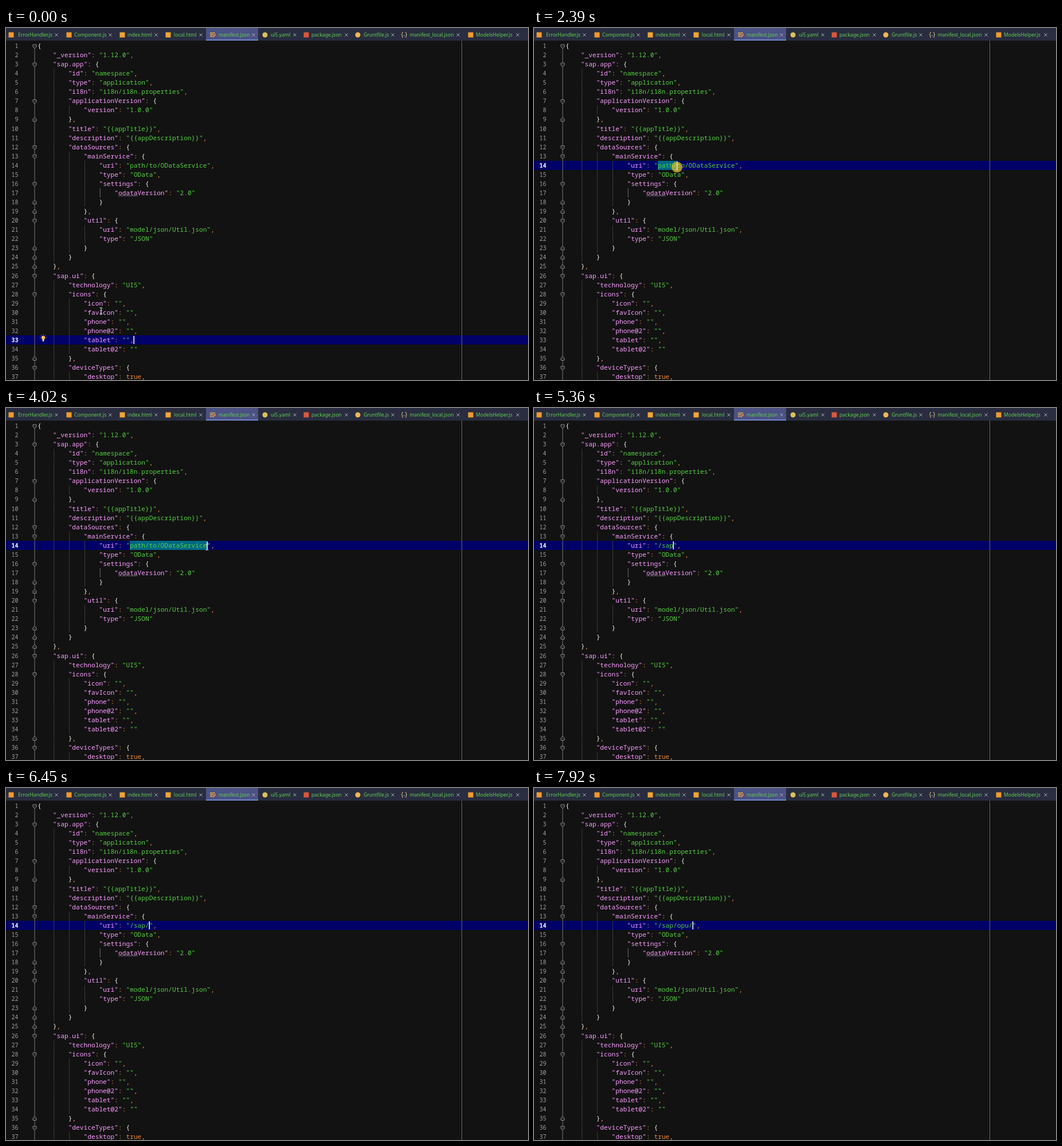
Recreate the animation shown at these times as an HTML page with a canvas. Size 911 by 615 pixels, loop 8 s.

```html
<!DOCTYPE html>
<html lang="en">
<head>
<meta charset="utf-8">
<title>Editor</title>
<style>
html, body { margin: 0; width: 100%; height: 100%; overflow: hidden; background: #121212; }
canvas { display: block; }
</style>
</head>
<body>
<canvas id="stage" width="911" height="615"></canvas>
<script>
const g = document.getElementById('stage').getContext('2d');
const LOOP = 8000, TICK = 1000 / 13;
const X0 = 54.9, CHAR = 6.72, ROW = 16.06;
const MONO = '"Noto Sans Mono", monospace', SANS = '"Noto Sans", sans-serif';
const BACK = '#121212', GREEN = '#54cf40', PINK = '#fb9cff', ORANGE = '#ee8a40', WHITE = '#f4f4f4';
const URI_ROW = 13, TABLET_ROW = 32, URI_COL = 24, TABLET_END = 25;

const source = `{
    "_version": "1.12.0",
    "sap.app": {
        "id": "namespace",
        "type": "application",
        "i18n": "i18n/i18n.properties",
        "applicationVersion": {
            "version": "1.0.0"
        },
        "title": "{{appTitle}}",
        "description": "{{appDescription}}",
        "dataSources": {
            "mainService": {
                "uri": "path/to/ODataService",
                "type": "OData",
                "settings": {
                    "odataVersion": "2.0"
                }
            },
            "util": {
                "uri": "model/json/Util.json",
                "type": "JSON"
            }
        }
    },
    "sap.ui": {
        "technology": "UI5",
        "icons": {
            "icon": "",
            "favIcon": "",
            "phone": "",
            "phone@2": "",
            "tablet": "",
            "tablet@2": ""
        },
        "deviceTypes": {
            "desktop": true,`.split('\n');

// name, text x, icon x, close x, icon kind
const tabs = [
  ['ErrorHandler.js', 21, 9, 88, 'js'], ['Component.js', 119, 110, 182, 'js'],
  ['index.html', 212, 203, 262, 'html'], ['local.html', 293, 283, 340, 'html'],
  ['manifest.json', 371, 361, 432, 'edit'], ['ui5.yaml', 462, 452, 504, 'yaml'],
  ['package.json', 533, 524, 594, 'npm'], ['Gruntfile.js', 624, 614, 675, 'grunt'],
  ['manifest_local.json', 704.5, 695, 789, 'json'], ['ModelsHelper.js', 820, 811, 893, 'js'],
];
const iconColor = { js: '#f09a2e', html: '#efa62f', yaml: '#dcc15a', npm: '#d9573c', grunt: '#efb65a' };

// time, x, y of the pointer
const pointerPath = [
  [0, 166, 494], [400, 166, 494], [620, 168, 462], [1000, 202, 302], [1240, 211, 245],
  [1530, 217, 242], [1700, 218, 241], [2070, 218, 242], [2390, 250, 243],
  [2700, 284, 243], [3200, 326, 243], [3560, 346, 243], [3790, 350, 243], [4020, 351, 243],
];
const keyTimes = [5035, 5115, 5185, 5355, 5965, 6695, 6935, 7235, 7545];
const CLICK = 1995, RELEASE = 4015, ERASE = 4795;

const colX = col => X0 + col * CHAR;
const rowY = row => 31 + row * ROW;
const rowTop = row => Math.round(rowY(row) - 8);

function rect(x, y, w, h, color) {
  g.fillStyle = color;
  g.fillRect(x, y, w, h);
}
function disc(x, y, r, color) {
  g.fillStyle = color;
  g.beginPath();
  g.arc(x, y, r, 0, 7);
  g.fill();
}
function path(points, color, width = 1, close = false) {
  g.beginPath();
  points.forEach(([x, y]) => g.lineTo(x, y));
  if (close) g.closePath();
  g.strokeStyle = color;
  g.lineWidth = width;
  g.stroke();
}
function text(str, x, y, color, font, align = 'left') {
  g.font = font;
  g.fillStyle = color;
  g.textAlign = align;
  g.fillText(str, x, y);
}

function pointerAt(t) {
  const time = Math.floor((t + 5) / TICK) * TICK;
  const i = pointerPath.findIndex(p => p[0] > time);
  if (i < 0) return pointerPath.at(-1).slice(1);
  const [a, b] = [pointerPath[i - 1], pointerPath[i]];
  const k = (time - a[0]) / (b[0] - a[0]);
  return [a[1] + (b[1] - a[1]) * k, a[2] + (b[2] - a[2]) * k];
}

function drawIcon(kind, x) {
  if (kind === 'json') {
    text('{', x - 3.5, 15, '#d8c890', '10px ' + SANS, 'center');
    text('}', x + 3.5, 15, '#d8c890', '10px ' + SANS, 'center');
    rect(x - 1.5, 13, 1, 1, '#d8c890');
    rect(x + 0.5, 13, 1, 1, '#d8c890');
  } else if (kind === 'edit') {
    [8, 11, 14].forEach((y, i) => rect(x - 5, y, 9 - i * 2.5, 1.5, '#f0b04a'));
    path([[x, 16], [x + 5, 11]], '#f08a3c', 2);
  } else if (kind === 'yaml' || kind === 'grunt') {
    disc(x, 12, 4.5, iconColor[kind]);
  } else {
    rect(x - 4.5, 7.5, 9, 9, iconColor[kind]);
  }
}

function drawTabs() {
  rect(0, 0, 911, 22, '#292d3f');
  rect(349, 0, 91, 20, '#4b5283');
  rect(349, 20, 91, 2, '#7184cc');
  for (const [name, x, iconX, closeX, kind] of tabs) {
    drawIcon(kind, iconX);
    text(name, x, 15.2, '#62d04e', '8.6px ' + SANS);
    path([[closeX - 2.5, 9.5], [closeX + 2.5, 14.5]], '#a5a8b8');
    path([[closeX + 2.5, 9.5], [closeX - 2.5, 14.5]], '#a5a8b8');
  }
}

function drawFold(y, dir) {
  const shape = [[-3, -3], [3, -3], [3, 1], [0, 3.7], [-3, 1]];
  const points = shape.map(([x, dy]) => [50 + x, y + dy * dir]);
  rect(47, y - 3, 6, 6, BACK);
  path(points, '#8f8f8f', 1, true);
  path([[48.5, y], [51.5, y]], '#6a6a6a');
}

function tokenColor(token, rest) {
  if (token[0] === '"') return rest[0] === ':' ? PINK : GREEN;
  return '{}'.includes(token) ? WHITE : ORANGE;
}

function drawLine(line, row, active) {
  const y = rowY(row), body = line.trim(), indent = line.length - body.length;
  for (let col = 4; col < indent; col += 4) {
    rect(colX(col) + 1.4, y - 8, 1, ROW, col === 16 ? '#6c6c6c' : '#3c3c3c');
  }
  text(row + 1, 21.5, y + 4, active ? '#ffffff' : '#a0a0a0',
    (active ? 'bold 10px ' : '10px ') + MONO, 'right');
  if (body.endsWith('{')) drawFold(y + 1, 1);
  if (body.startsWith('}')) drawFold(y + 0.5, -1);
  for (const m of line.matchAll(/"[^"]*"|[{}:,]|true/g)) {
    const color = tokenColor(m[0], line.slice(m.index + m[0].length));
    text(m[0], colX(m.index), y + 4, color, '500 11.2px ' + MONO);
  }
}

function drawTypo() {
  const wave = Array.from({ length: 18 }, (_, i) => [196 + i * 2, 292.5 + i % 2 * 1.5]);
  path(wave, '#8a8a8a', 0.8);
}

function drawBulb() {
  disc(65, 541, 3.2, '#f3bd4e');
  rect(63.5, 543.5, 3, 4, '#d8d0b8');
  for (let a = -3.14; a <= 0.1; a += 0.785) {
    const c = Math.cos(a), s = Math.sin(a);
    path([[65 + c * 4.5, 541 + s * 4.5], [65 + c * 6, 541 + s * 6]], '#c99a45');
  }
}

function drawPointer(x, y, pressed) {
  if (pressed) disc(x, y, 9.5, 'rgba(208, 186, 40, 0.78)');
  path([[x, y - 5], [x, y + 5]], '#d8d8d8');
  for (const end of [-5, 5]) path([[x - 2.5, y + end], [x + 2.5, y + end]], '#d8d8d8');
}

function draw(t) {
  const clicked = t >= CLICK, erased = t >= ERASE;
  const activeRow = clicked ? URI_ROW : TABLET_ROW;
  const typed = '/sap/opu/'.slice(0, keyTimes.filter(k => t >= k).length);
  const [px, py] = pointerAt(t);
  const dragged = Math.max(0, Math.min(20, Math.round((px - colX(URI_COL)) / CHAR)));

  rect(0, 0, 911, 615, BACK);
  rect(0, rowTop(activeRow), 911, 16, '#000068');
  rect(795, 22, 1, 593, '#6a6a6a');
  rect(49.5, 36, 1, 579, '#777777');
  if (clicked && !erased) rect(colX(URI_COL), rowTop(URI_ROW), dragged * CHAR, 16, '#006884');

  source.forEach((line, row) => {
    const shown = erased && row === URI_ROW ? line.replace('path/to/ODataService', typed) : line;
    drawLine(shown, row, row === activeRow);
  });
  drawTypo();
  if (!clicked) drawBulb();

  const caretCol = clicked ? URI_COL + (erased ? typed.length : dragged) : TABLET_END;
  const caretOn = clicked || (t + 40) % 1000 < 500;
  if (caretOn) rect(Math.round(colX(caretCol)) - 0.5, rowTop(activeRow) + 1, 1.5, 14, '#ffffff');
  if (!erased) drawPointer(px, py, clicked && t < RELEASE);
  drawTabs();
}

function tick() {
  draw(performance.now() % LOOP);
  requestAnimationFrame(tick);
}
tick();
</script>
</body>
</html>
```
